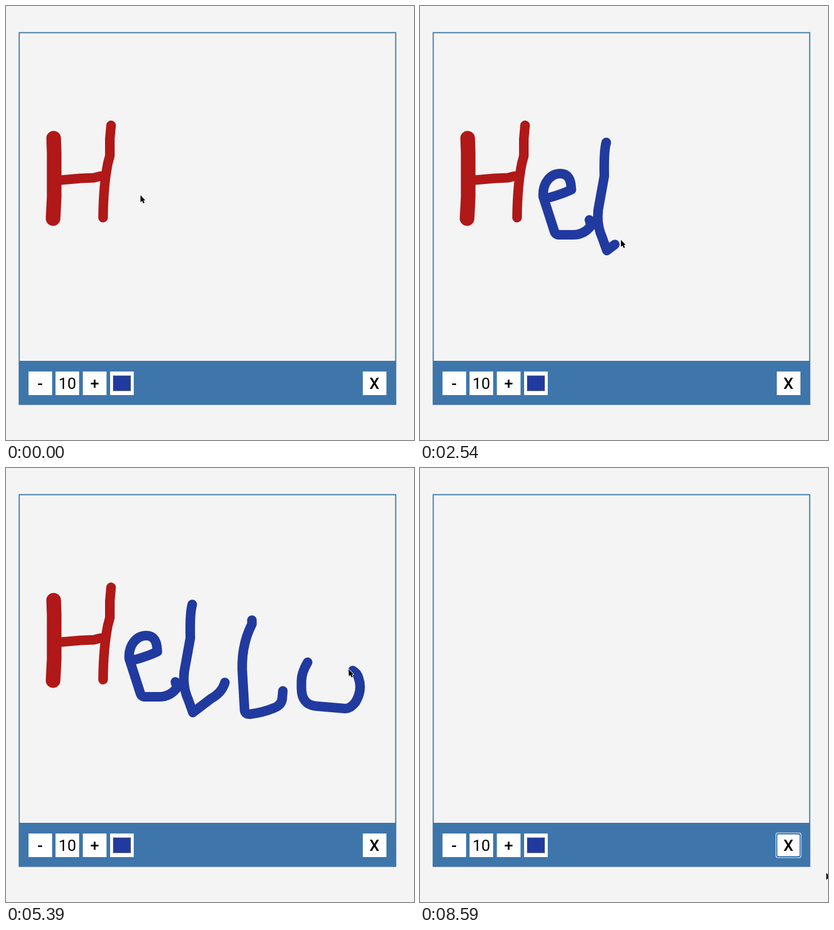
Write an HTML page that moves like this. It is 725 by 773 pixels and loops after 9.59 s.

```html
<!DOCTYPE html>
<html lang="en">
<head>
<meta charset="utf-8">
<title>Drawing pad</title>
<style>
  html, body { margin: 0; width: 100%; height: 100%; overflow: hidden; background: #f4f4f4; }
  svg { display: block; width: 725px; height: 773px; }
  text { font-family: Roboto, sans-serif; font-size: 28px; text-anchor: middle; }
  #drawing { fill: none; stroke-width: 17; stroke-linecap: round; stroke-linejoin: round; }
</style>
</head>
<body>
<svg viewBox="0 0 725 773">
  <defs>
    <path id="arrow" d="M0 0V12.5L2.9 10L5 14.6L7.2 13.6L5.2 9.2H8.6Z"/>
  </defs>

  <rect x="23.5" y="47.5" width="669" height="662" fill="none" stroke="#3f7ba8" stroke-width="2"/>
  <rect x="23.5" y="632.5" width="669" height="77" fill="#3e76ab" stroke="#3f67ae"/>
  <path fill="#fff" d="M40 651h42v42h-42zM88 651h42v42h-42zM136.6 651h42v42h-42zM185 651h42v42h-42zM634 651h42v42h-42z"/>
  <rect x="190.5" y="658.5" width="31" height="27" fill="#213a9f" stroke="#777"/>
  <g id="ring" fill="#fff">
    <rect x="632" y="649.5" width="45.5" height="45" rx="4"/>
    <rect x="634" y="651.5" width="41.5" height="41" rx="2.5" stroke="#1d5fa8" stroke-width="1.8"/>
  </g>
  <text x="109" y="682">10</text>
  <g font-weight="500">
    <text x="60.5" y="682">-</text>
    <text x="157.5" y="682">+</text>
    <text x="654.5" y="682">X</text>
  </g>

  <g id="drawing">
    <g stroke="#b11818">
      <path stroke-width="26" d="M84.7 235.5L85.6 262V340L83.6 378.5"/>
      <path d="M186.7 212.5L184.5 237V267L181 280Q173 320 172.5 377M98 310L132 307L156 306L168 303"/>
    </g>
    <g stroke="#213a9f">
      <path id="e" d="M225 342.5Q250 336 269 327L268 317Q265 298.5 249 298.5C233 298.5 217 314 219 340L238 399Q240 407 246 407.5H268Q291 409 304 391L301 381"/>
      <path id="l1" d="M331 243Q326.5 258 327.5 303L319 350Q311 384 324 413L332 435.5L364 411Q384 400 389 382"/>
      <path id="l2" d="M437 271V278Q416 319 420.5 372L424 432Q425 438.5 433 438.5Q455 436 476 427.5Q491 422 491 408L492 397"/>
      <path id="o" d="M536 346Q525 364 525 380V392Q525 421 550 424L603 428.5Q613 428 621 417Q634 396 626.5 374Q622 359 605 358L550 356"/>
    </g>
  </g>

  <use id="ghost" href="#arrow" x="614" y="652" fill="#3b55a5" stroke="#3b62a5"/>
  <g id="cursor" stroke-linejoin="round">
    <use id="pointer" href="#arrow" fill="#000" stroke="#fff" stroke-width="1.6" paint-order="stroke"/>
    <path id="hand" fill="#fff" stroke="#000" d="M-2.6 1.2C-2.6-.4-.4-.6 .1 .8L1.7 4.8C2.2 3.6 4 3.8 4.3 4.8C5 4 6.2 4.4 6.5 5.4C7.5 5 8.3 6 8.3 7.2L8.4 10L7.4 13.2L1.8 14L-1.6 11L-4.6 8.6C-5.4 7.2-3.6 6.4-2.4 7.2L-.9 8.4ZM2.6 8.4V11.4M4.7 8.2V11.2"/>
  </g>
</svg>
<script>
const LOOP = 9590, TICK = 50, FIRST_TICK = 40;
const LEAD = 30; // ms by which the cursor runs ahead of the ink
const $ = id => document.getElementById(id);
const show = (id, on) => $(id).setAttribute('visibility', on ? 'visible' : 'hidden');
const easeOut = k => 1 - (1 - k) ** 1.7;
const progress = (leg, t) => Math.min(1, Math.max(0, (t - leg.start) / (leg.end - leg.start)));

const legs = [];
let tip = [239, 337];

// Glide with the pen lifted.
function move(start, end, x, y) {
  const [fromX, fromY] = tip;
  legs.push({ start, end, at: k => [fromX + (x - fromX) * k, fromY + (y - fromY) * k] });
  tip = [x, y];
}

// Glide to the start of a letter, then write it, slowing towards its end.
function write(id, lift, start, end) {
  const path = $(id), size = path.getTotalLength();
  const at = k => {
    const { x, y } = path.getPointAtLength(size * easeOut(k));
    return [x, y];
  };
  move(lift, start, ...at(0));
  legs.push({ id, size, start, end, at });
  tip = at(1);
}

move(30, 190, 111, 316);
move(340, 440, 93, 324);
write('e', 440, 720, 1440);
write('l1', 1560, 2230, 2760);
write('l2', 2760, 3530, 4190);
write('o', 4320, 4800, 5810);
move(5810, 6170, 614, 652);
move(6170, 6220, 647, 660);
move(6400, 6550, 650, 667);
move(7780, 7790, 670, 684);
move(8560, 8600, 722, 721);

function draw(now) {
  const time = now % LOOP;
  const t = time < FIRST_TICK ? 0 : time - (time - FIRST_TICK) % TICK;

  for (const leg of legs.filter(l => l.id)) {
    $(leg.id).style.strokeDasharray = `${leg.size * easeOut(progress(leg, t))} 9999`;
    show(leg.id, t >= leg.start && t < 7640);
  }

  const ahead = t + LEAD;
  const leg = legs.findLast(l => ahead >= l.start) || legs[0];
  const [x, y] = leg.at(progress(leg, ahead));
  const overButton = x > 634 && x < 676 && y > 651 && y < 693;
  $('cursor').setAttribute('transform', `translate(${x} ${y})`);
  show('hand', overButton);
  show('pointer', !overButton);
  show('ghost', t >= 6190 && t < 6240);
  show('ring', t >= 6890);
  $('drawing').style.display = t < 7640 ? '' : 'none';
  requestAnimationFrame(draw);
}
requestAnimationFrame(draw);
</script>
</body>
</html>
```
